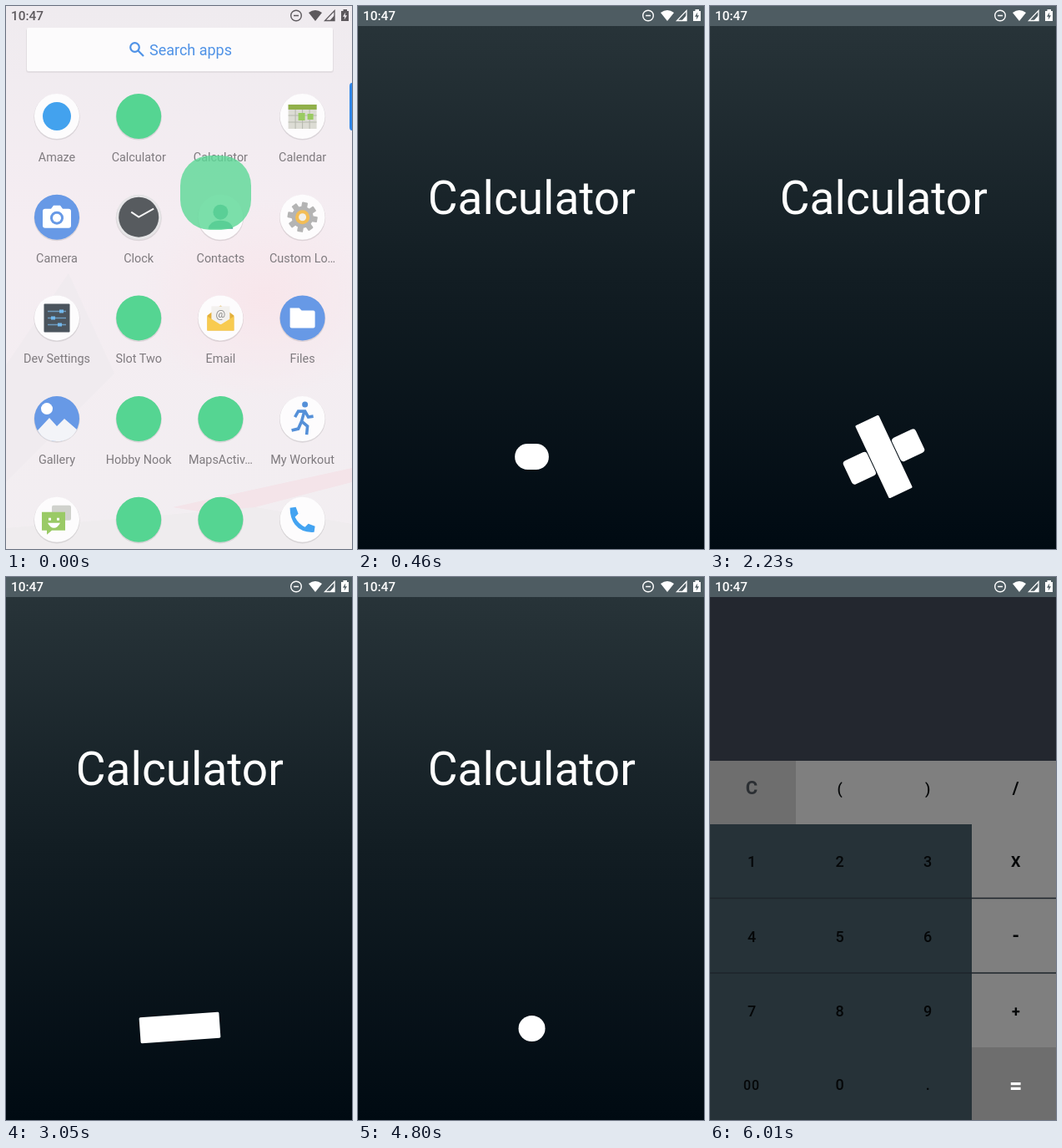
An HTML page for the animation above (7.93 s loop, 415 px wide and 650 px high).

```html
<!DOCTYPE html>
<html lang="en">
<head>
<meta charset="utf-8">
<title>Calculator launch</title>
<style>
  html, body { margin: 0; width: 100%; height: 100%; overflow: hidden; background: #f1ecf0; }
  svg { display: block; width: 415px; height: 650px; font-family: Roboto, sans-serif; }
  .mid { text-anchor: middle; }
  .label { font-size: 14.4px; fill: #7f7b7f; text-anchor: middle; }
  .key { font-size: 18px; font-weight: 500; text-anchor: middle; fill: #050708; }
  .bold { font-weight: 700; }
</style>
</head>
<body>
<svg viewBox="0 0 415 650">
  <defs>
    <linearGradient id="night" x1="0" y1="0" x2="0" y2="1">
      <stop offset="0.03" stop-color="#283439"/>
      <stop offset="0.5" stop-color="#121d23"/>
      <stop offset="1" stop-color="#000a12"/>
    </linearGradient>
    <linearGradient id="wall" x1="0" y1="0" x2="0" y2="1">
      <stop offset="0" stop-color="#efebef"/>
      <stop offset="0.4" stop-color="#f5edf2"/>
      <stop offset="1" stop-color="#f2eef1"/>
    </linearGradient>
    <radialGradient id="blush">
      <stop offset="0" stop-color="#f8e6eb"/>
      <stop offset="1" stop-color="#f8e6eb" stop-opacity="0"/>
    </radialGradient>
    <clipPath id="windowClip"><rect id="windowRect"/></clipPath>
    <clipPath id="loaderClip"><rect y="400" width="415" height="270"/></clipPath>
  </defs>

  <g id="launcher">
    <rect width="415" height="650" fill="url(#wall)"/>
    <ellipse cx="310" cy="350" rx="150" ry="120" fill="url(#blush)"/>
    <path d="M0 430L75 320L130 440L0 570Z" fill="#f0ebef"/>
    <path d="M200 600L415 553V570L260 610Z" fill="#f4e4e9"/>
    <path d="M0 625L300 600L415 620V650H0Z" fill="#efecee"/>
    <rect x="24" y="27" width="369" height="53" rx="3" fill="#000" opacity=".06"/>
    <rect x="25" y="26" width="367" height="52" rx="2" fill="#fcfbfc"/>
    <g fill="none" stroke="#4f92e6" stroke-width="2.2">
      <circle cx="154.5" cy="49.5" r="5.3"/><path d="M158.5 53.5L165 60"/>
    </g>
    <text x="221.5" y="59" class="mid" font-size="18" fill="#4f92e6">Search apps</text>
    <path d="M415 92Q412 92 412 96V145Q412 149 415 149Z" fill="#2f86e8"/>
    <g id="apps"></g>
  </g>

  <rect id="lifted" fill="#5cd997"/>

  <g clip-path="url(#windowClip)">
    <g id="window">
      <rect width="415" height="650" fill="#eeeff1"/>
      <rect x="21" y="648" width="394" height="2" fill="#000"/>
      <g id="splash">
        <rect id="night-bg" x="-10" y="-3" width="435" height="656" fill="url(#night)"/>
        <rect x="-10" y="-3" width="435" height="27" fill="#4e5c62"/>
        <text x="208.3" y="248.5" class="mid" font-size="55" fill="#fff">Calculator</text>
        <g clip-path="url(#loaderClip)">
          <g id="loader" fill="#fff">
            <rect id="sideA" x="-15.5" width="31" height="31.5" rx="4"/>
            <rect id="sideB" x="-15.5" width="31" height="31.5" rx="4"/>
            <rect id="bar" y="-15.5" height="31"/>
            <rect id="lower" x="-48" y="-15.5" width="96" height="31" rx="1.5"/>
          </g>
        </g>
      </g>
    </g>
  </g>

  <g id="calc">
    <rect width="415" height="650" fill="#23272f"/>
    <rect width="415" height="24" fill="#4e5c62"/>
    <rect y="220" width="415" height="430" fill="#7f7f7f"/>
    <rect y="220" width="103" height="76" fill="#6e6e6e"/>
    <rect x="314" y="563" width="101" height="87" fill="#6e6e6e"/>
    <rect y="296" width="314" height="354" fill="#263238"/>
    <path d="M0 384.5H415M0 474H415" stroke="#1e242b" stroke-width="1.3"/>
    <g id="keys"></g>
  </g>

  <g id="status">
    <text x="6" y="17" font-size="15.4" font-weight="500">10:47</text>
    <circle cx="348" cy="11.5" r="6.3" fill="none" stroke="currentColor" stroke-width="1.4"/>
    <path d="M345 10.8H351V12.3H345ZM363 8Q371 2 379 8L371 18ZM402 6H404.5V4H409V6H411V18H402Z"/>
    <path d="M394 5.5V17.5H382.5Z" fill="none" stroke="currentColor" stroke-width="1.3"/>
    <path d="M394 11V18H388Z"/>
    <path id="bolt" d="M407.3 7.5L404 12.8H406.3L405.7 16.5L409 11.2H406.7Z"/>
  </g>
</svg>

<script>
const LOOP = 7930;
const $ = id => document.getElementById(id);
const set = (id, attrs) => {
  for (const name in attrs) $(id).setAttribute(name, attrs[name]);
};

// ---- Launcher icons, drawn around 0,0 with radius 27 ----
const disc = color => `<circle cy="1" r="27.6" fill="#000" opacity=".1"/><circle r="27" fill="${color}"/>`;
const white = disc('#fdfcfd');
const green = disc('#55d592');
const blue = disc('#6799e6');
const ring = Array.from({ length: 8 }, (_, i) =>
  `<rect x="-3.5" y="-18" width="7" height="9" rx="1" transform="rotate(${i * 45 + 10})"/>`).join('');

const icons = {
  plain: green,
  dot: white + '<circle r="17" fill="#43a2ee"/>',
  calendar: white + `<rect x="-17" y="-14" width="34" height="29" fill="#dcdcd4"/>
    <rect x="-17" y="-14" width="34" height="6" fill="#91b04a"/>
    <path d="M-17 -1H17M-17 7H17M-8.5 -8V15M0 -8V15M8.5 -8V15" stroke="#b5b8ae"/>
    <path d="M-5 -4H3V5H-5ZM6 -3H13V4H6Z" fill="#9acb62"/>`,
  camera: blue + `<path d="M-14 -10H-7L-4 -14H4L7 -10H14Q17 -10 17 -7V10Q17 13 14 13H-14Q-17 13 -17 10V-7Q-17 -10 -14 -10Z" fill="#fff"/>
    <circle cy="1" r="8" fill="#6799e6"/><circle cy="1" r="5" fill="#fff"/>`,
  clock: disc('#e6e5e7') + `<circle r="24" fill="#575b5f"/>
    <path d="M-9 -6L0 0L18 -10" fill="none" stroke="#f4f4f4" stroke-width="2"/>`,
  person: white + '<circle cy="-6" r="9" fill="#55ab98"/><path d="M-15 14Q-13 4 0 4Q13 4 15 14Z" fill="#55ab98"/>',
  gear: white + `<g fill="#b4b4b4">${ring}<circle r="13"/></g><circle r="8.5" fill="#f3bd55"/><circle r="4.5" fill="#f1efe9"/>`,
  sliders: white + `<rect x="-15.5" y="-17" width="31" height="34" rx="1" fill="#4b545d"/>
    <path d="M-11 -8H11M-11 0H11M-11 8H11" stroke="#6d9bc0" stroke-width="1.5"/>
    <path d="M3 -10H8V-6H3ZM-7 -2H-2V2H-7ZM1 6H6V10H1Z" fill="#72b8ed"/>`,
  mail: white + `<path d="M-16 -3L0 -15L16 -3V15H-16Z" fill="#e3b03c"/><rect x="-11" y="-14" width="22" height="22" fill="#f3f1ee"/>
    <text y="0" class="mid" font-size="13" fill="#888">@</text><path d="M-16 -2L0 8L16 -2V15H-16Z" fill="#f8cb50"/>`,
  folder: blue + '<path d="M-15 -12H-4L-1 -9H13Q15 -9 15 -7V10Q15 12 13 12H-13Q-15 12 -15 10Z" fill="#fff"/>',
  picture: blue + `<circle cx="-12" cy="-12" r="7" fill="#fff"/>
    <path d="M-23 14L-9 -1L0 9L9 0L24 13Q17 27 0 27Q-16 27 -23 14Z" fill="#f3f4f8"/>`,
  runner: white + `<circle cx="3" cy="-17" r="3.5" fill="#5590d8"/>
    <path d="M-9 -2L-5 -9L3 -9L7 -2L13 -3M2 -8L-1 3L6 9L5 19M-1 3L-5 12L-13 14" fill="none" stroke="#5590d8" stroke-width="3.6"/>`,
  chat: white + `<rect x="-6" y="-17" width="23" height="18" rx="2" fill="#d0d2cd"/>
    <path d="M-18 -9H10V13H-6L-12 18V13H-18Z" fill="#9aca66"/>
    <path d="M-10 -2H-7V1H-10ZM0 -2H3V1H0ZM-11 4H4Q1 10 -3.5 10Q-8 10 -11 4Z" fill="#fff"/>`,
  phone: white + `<path d="M-15 -14L-8 -15L-5 -7L-9 -3Q-5 5 3 9L7 5L15 8L14 15Q-1 16 -9 6Q-15 -2 -15 -14Z" fill="#43a3f1"/>`
};

const apps = [
  ['dot', 'Amaze'], ['plain', 'Calculator'], [null, 'Calculator'], ['calendar', 'Calendar'],
  ['camera', 'Camera'], ['clock', 'Clock'], ['person', 'Contacts'], ['gear', 'Custom Lo…'],
  ['sliders', 'Dev Settings'], ['plain', 'Slot Two'], ['mail', 'Email'], ['folder', 'Files'],
  ['picture', 'Gallery'], ['plain', 'Hobby Nook'], ['plain', 'MapsActiv…'], ['runner', 'My Workout'],
  ['chat', ''], ['plain', ''], ['plain', ''], ['phone', '']
];
$('apps').innerHTML = apps.map(([icon, name], i) => {
  const x = 61 + (i % 4) * 98.2;
  const y = 132 + Math.floor(i / 4) * 120.7;
  return `<g transform="translate(${x} ${y})">${icon ? icons[icon] : ''}<text y="54" class="label">${name}</text></g>`;
}).join('');

// ---- Calculator keys ----
const rows = [['C', '(', ')', '/'], ['1', '2', '3', 'X'], ['4', '5', '6', '-'], ['7', '8', '9', '+'], ['00', '0', '.', '=']];
const rowY = [260, 346.5, 436.5, 525.5, 614];
const keyStyle = {
  'C': 'font-size:22px;fill:#2b2f33', '/': 'font-size:21px', '00': 'font-size:16px;letter-spacing:1px',
  '-': 'font-size:22px', '=': 'font-size:27px;fill:#fff'
};
$('keys').innerHTML = rows.map((row, r) => row.map((key, c) => {
  const bold = c === 3 || key === 'C' ? ' bold' : '';
  const y = rowY[r] + (key === '=' ? 4 : 0);
  return `<text x="${50 + c * 105.6}" y="${y}" class="key${bold}" style="${keyStyle[key] || ''}">${key}</text>`;
}).join('')).join('');

// ---- Timing helpers ----
const progress = (t, from, to) => Math.min(1, Math.max(0, (t - from) / (to - from)));
const sine = p => (1 - Math.cos(Math.PI * p)) / 2;
const quad = p => p < .5 ? 2 * p * p : 1 - 2 * (1 - p) ** 2;
const easeOut = p => 1 - (1 - p) ** 3;
const mix = (a, b, p) => a + (b - a) * p;
const scaled = s => `translate(207.5 325) scale(${s}) translate(-207.5 -325)`;

function drawOpening(t) {
  const grow = easeOut(progress(t, 60, 250));
  const frame = {
    x: mix(209, 0, grow), y: mix(179, 0, grow),
    width: mix(85, 415, grow), height: mix(89, 650, grow), rx: mix(36, 0, grow)
  };
  set('windowRect', frame);
  set('lifted', { ...frame, opacity: .8 * (1 - progress(t, 130, 250)) });
  set('launcher', { opacity: 1 - .6 * progress(t, 60, 250) });
  set('window', { opacity: progress(t, 60, 220) });
  const settle = progress(t, 390, 450);
  set('night-bg', { opacity: mix(.3, 1, settle) });
  const zoom = t < 5660 ? mix(.985, 1, settle) : mix(1.008, 1.06, progress(t, 5660, 6010));
  set('splash', { transform: scaled(zoom) });
}

function drawLoader(t) {
  const stretch = quad(progress(t, 340, 800));
  const ball = t >= 4240;
  const width = ball ? 32 : mix(32, 96, stretch);
  set('bar', { x: -width / 2, width, rx: ball ? 16 : mix(15.5, 1.5, stretch ** 2) });

  const wobble = 7.5 * Math.sin(2 * Math.PI * progress(t, 870, 1660));
  const turn = 90 * sine(progress(t, 1740, 2500)) + 90 * sine(progress(t, 2600, 3120));
  const fall = 650 * (Math.max(0, t - 3790) / 1000) ** 2;
  const y = ball ? mix(384, 540.5, easeOut(progress(t, 4240, 4530))) : 539.5 + fall;
  set('loader', { transform: `translate(208.5 ${y}) rotate(${ball ? 0 : wobble + turn})` });

  const reach = sine(progress(t, 1740, 2130)) * (1 - sine(progress(t, 2650, 3000)));
  const side = mix(-15.5, 16.5, reach);
  const display = reach > 0 ? 'inline' : 'none';
  set('sideA', { y: side, display });
  set('sideB', { y: -side - 31.5, display });

  const drop = 45 * sine(progress(t, 3100, 3390)) + 4 * sine(progress(t, 3430, 3600));
  set('lower', { transform: `rotate(${-turn}) translate(0 ${drop})`, display: t > 3100 && !ball ? 'inline' : 'none' });
}

function drawCalc(t) {
  set('calc', {
    opacity: progress(t, 5715, 5800),
    transform: scaled(mix(.88, 1, easeOut(progress(t, 5700, 6010))))
  });
  const light = t >= 190;
  const color = light ? '#fff' : '#5d595d';
  set('status', { fill: color, color });
  set('bolt', { fill: light ? '#4e5c62' : '#efebef' });
}

let start;
function render(now) {
  start ??= now;
  const t = (now - start) % LOOP;
  drawOpening(t);
  drawLoader(t);
  drawCalc(t);
  requestAnimationFrame(render);
}
requestAnimationFrame(render);
</script>
</body>
</html>
```
